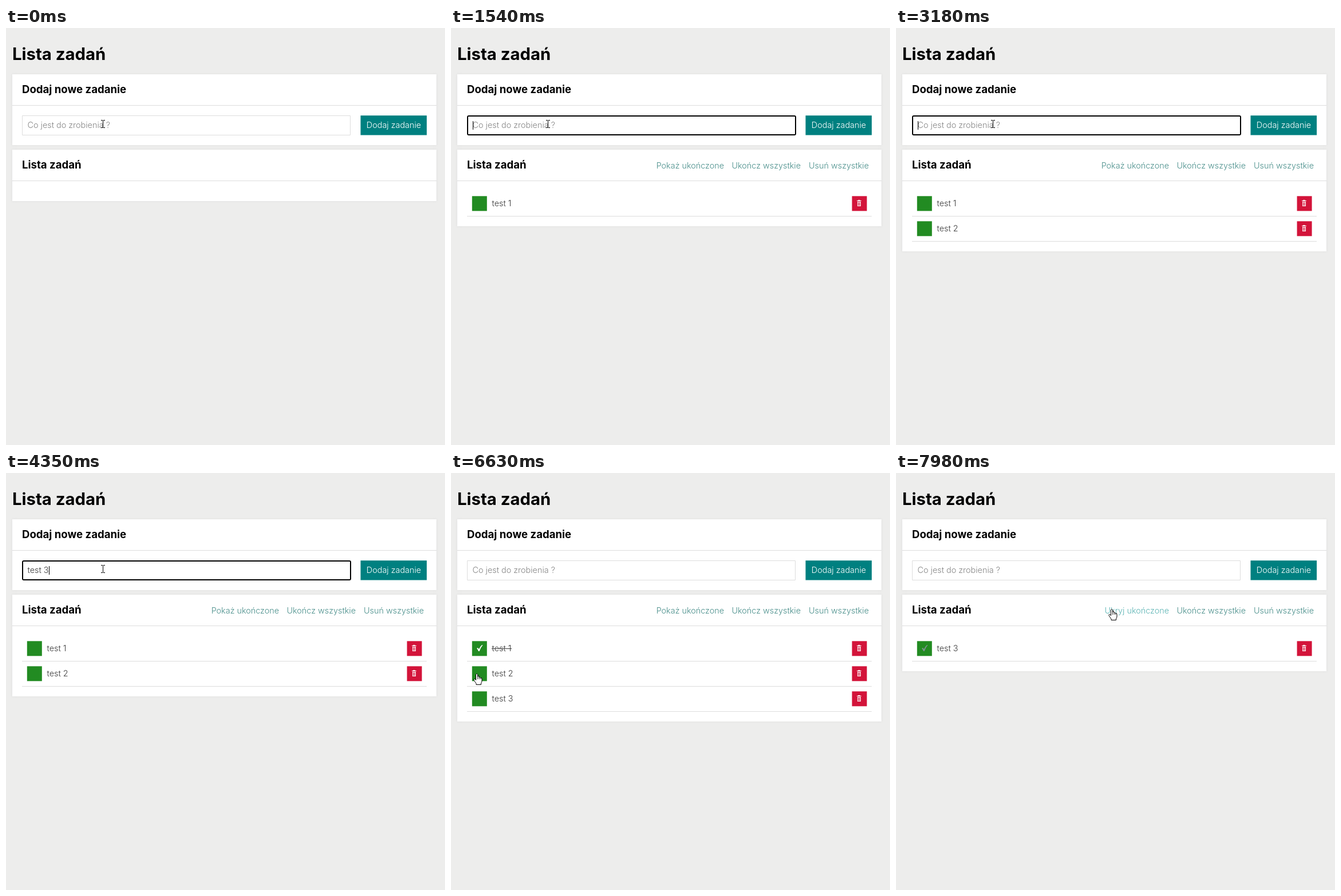
An HTML page with a canvas that plays this animation: 767x730 px, repeating every 8000 ms.

```html
<!DOCTYPE html>
<html lang="pl">
<head>
<meta charset="utf-8">
<title>Lista zadań</title>
<style>
html, body { margin: 0; width: 100%; height: 100%; overflow: hidden; background: #ededec; }
canvas { display: block; }
</style>
</head>
<body>
<canvas id="stage" width="767" height="730"></canvas>
<script>
const ctx = document.getElementById('stage').getContext('2d');
const LOOP = 8000;
const FAMILY = 'Inter, "Open Sans", sans-serif';
const LIGHT = `300 14.4px ${FAMILY}`;
const BOLD = `700 18.6px ${FAMILY}`;
const TITLE = `700 29.3px ${FAMILY}`;
const HINT = 'Co jest do zrobienia ?';
const INK = '#3a3a3a';
const LINK = [72, 142, 138];
const LINK_HOVER = [92, 180, 180];

// Moment of each keystroke, then of pressing Enter
const entries = [
  { text: 'test 1', keys: [820, 920, 1060, 1130, 1290, 1370], enter: 1540 },
  { text: 'test 2', keys: [2250, 2310, 2460, 2540, 2620, 2930], enter: 3180 },
  { text: 'test 3', keys: [3720, 3870, 3950, 4030, 4200, 4350], enter: 4500 }
];
const focusTime = [70, 5930];
const caretOff = [[580, 820], [1930, 2250], [3480, 3720], [4900, 5460]];
const doneAt = [6010, 6850, Infinity];
const hideAt = 7980;
const hoverAt = 7630;
const FADE = 300;

// time, x, y, pointer kind
const track = [
  [0, 169, 168, 'beam'], [5050, 183, 171, 'beam'], [5130, 180, 205, 'arrow'],
  [5210, 155, 252, 'arrow'], [5290, 120, 296, 'arrow'], [5370, 94, 324, 'arrow'],
  [5460, 84, 323, 'arrow'], [5520, 76, 321, 'arrow'], [5690, 59, 316, 'hand'],
  [5770, 52, 311, 'hand'], [5850, 49, 310, 'hand'], [6230, 48, 317, 'hand'],
  [6310, 46, 330, 'arrow'], [6390, 43, 342, 'hand'], [6470, 40, 351, 'hand'],
  [6550, 43, 354, 'hand'], [6630, 45, 351, 'hand'], [6930, 96, 332, 'arrow'],
  [7000, 163, 302, 'arrow'], [7090, 226, 272, 'arrow'], [7170, 292, 246, 'arrow'],
  [7250, 346, 226, 'arrow'], [7330, 370, 221, 'arrow'], [7400, 375, 220, 'arrow'],
  [7550, 376, 225, 'arrow'], [7630, 377, 234, 'hand'], [7720, 377, 238, 'hand']
];

const clamp = v => Math.max(0, Math.min(1, v));
const within = (t, [a, b]) => t >= a && t < b;
const mix = (a, b, k) => `rgb(${a.map((v, i) => v + (b[i] - v) * k).join()})`;

function box(x, y, w, h, color) {
  ctx.fillStyle = color;
  ctx.fillRect(x, y, w, h);
}

function label(text, x, y, font, color, align = 'left') {
  ctx.font = font;
  ctx.fillStyle = color;
  ctx.textAlign = align;
  ctx.fillText(text, x, y);
}

function textWidth(text) {
  ctx.font = LIGHT;
  return ctx.measureText(text).width;
}

function panel(y, h, title) {
  ctx.save();
  ctx.shadowColor = '#ddd';
  ctx.shadowBlur = 4;
  box(11, y, 741, h, '#fff');
  ctx.restore();
  box(11, y + 54, 741, 1, '#ddd');
  label(title, 28, y + 33, BOLD, '#000');
}

function input(t) {
  const focused = within(t, focusTime);
  ctx.beginPath();
  if (focused) {
    ctx.roundRect(29, 154, 573, 33, 2);
    ctx.lineWidth = 2;
    ctx.strokeStyle = '#000';
  } else {
    ctx.rect(28.5, 153.5, 573, 34);
    ctx.lineWidth = 1;
    ctx.strokeStyle = '#ddd';
  }
  ctx.stroke();

  const entry = entries.find(e => t >= e.keys[0] && t < e.enter);
  const typed = entry ? entry.text.slice(0, entry.keys.filter(k => t >= k).length) : '';
  label(typed || HINT, 37.5, 175, LIGHT, typed ? INK : '#858585');
  if (focused && !caretOff.some(span => within(t, span))) {
    box(Math.round(38 + textWidth(typed)), 163, 1, 15, '#000');
  }
}

function bin(x, y) {
  box(x, y + 1, 8, 1, '#fff');
  box(x + 2, y, 4, 1, '#fff');
  ctx.strokeStyle = '#fff';
  ctx.lineWidth = 1;
  ctx.strokeRect(x + 1.5, y + 3.5, 5, 7);
  box(x + 3, y + 4, 0.7, 6, '#fff');
  box(x + 4.6, y + 4, 0.7, 6, '#fff');
}

function check(x, y, alpha, color = '#fff') {
  ctx.save();
  ctx.globalAlpha = alpha;
  ctx.fillStyle = color;
  ctx.beginPath();
  ctx.moveTo(x, y + 6);
  ctx.lineTo(x + 2, y + 5);
  ctx.quadraticCurveTo(x + 3.2, y + 6, x + 3.8, y + 7.6);
  ctx.quadraticCurveTo(x + 6, y + 2.5, x + 9, y);
  ctx.lineTo(x + 10.5, y + 0.3);
  ctx.quadraticCurveTo(x + 6.5, y + 5, x + 4.6, y + 11);
  ctx.lineTo(x + 3, y + 11);
  ctx.quadraticCurveTo(x + 2, y + 8, x, y + 6);
  ctx.fill();
  ctx.restore();
}

function row(slot, index, t) {
  const y = 294 + 44 * slot;
  const { text } = entries[index];
  const done = t >= doneAt[index];
  box(36.8, y + 0.3, 26, 26, '#228b22');
  box(700.6, y + 0.3, 26, 26, '#d3143a');
  bin(709, y + 7);
  box(28, y + 35, 707, 1, '#ddd');
  label(text, 71.5, y + 18, LIGHT, INK);
  if (done) {
    box(71, y + 13, textWidth(text) + 1, 1, INK);
    check(45, y + 7, clamp((t - doneAt[index]) / FADE));
  } else if (t >= hideAt) {
    check(45, y + 7, 1 - (t - hideAt) / FADE, '#7c9390');
  }
}

function list(t) {
  const hidden = t >= hideAt;
  const shown = [0, 1, 2].filter(i => t >= entries[i].enter && !(hidden && t >= doneAt[i]));
  panel(213, 90 + 44 * shown.length, 'Lista zadań');
  if (!shown.length) return;
  const color = mix(LINK, LINK, 0);
  const hover = mix(LINK, LINK_HOVER, clamp((t - hoverAt) / FADE));
  label(hidden ? 'Ukryj ukończone' : 'Pokaż ukończone', 477, 246, LIGHT, hover, 'right');
  label('Ukończ wszystkie', 611, 246, LIGHT, color, 'right');
  label('Usuń wszystkie', 730, 246, LIGHT, color, 'right');
  shown.forEach((index, slot) => row(slot, index, t));
}

const arrowShape = new Path2D('M.5 .5V13.8L3.5 11L5.6 16L7.8 15L5.7 10.2H9.6Z');
const handShape = new Path2D('M-1.5 1.5Q0-.8 1.5 1.5V6.5Q3-.0 4.2 7' +
  'Q5.8 5.4 6.8 7.8Q8.8 6.8 9 9.5V13Q9 15.5 7.5 17V19.5H-1V17.5' +
  'Q-3.5 14-5 11.5Q-5.5 9.3-3.5 9.5L-1.5 11.5Z');

function pointer(t) {
  const [, x, y, kind] = track.filter(p => t >= p[0]).pop();
  ctx.save();
  ctx.translate(x, y);
  if (kind === 'beam') {
    box(0, -6, 1, 12, '#000');
    for (const top of [-7, 6]) {
      box(-3, top, 3, 1, '#000');
      box(1, top, 3, 1, '#000');
    }
  } else {
    const shape = kind === 'hand' ? handShape : arrowShape;
    ctx.fillStyle = '#fff';
    ctx.strokeStyle = '#000';
    ctx.lineWidth = 1;
    ctx.lineJoin = 'round';
    ctx.fill(shape);
    ctx.stroke(shape);
    if (kind === 'hand') {
      for (const fx of [1.5, 4.2, 6.8]) box(fx - 0.4, 7, 0.8, 3, '#000');
    }
  }
  ctx.restore();
}

function draw(t) {
  box(0, 0, 767, 730, '#ededec');
  label('Lista zadań', 11, 56, TITLE, '#000');
  panel(81, 124, 'Dodaj nowe zadanie');
  input(t);
  box(619.5, 153.2, 115.6, 34.3, '#008080');
  label('Dodaj zadanie', 677.5, 175, LIGHT, '#fff', 'center');
  list(t);
  pointer(t);
}

const start = performance.now();
function tick() {
  draw((performance.now() - start) % LOOP);
  requestAnimationFrame(tick);
}
tick();
</script>
</body>
</html>
```
